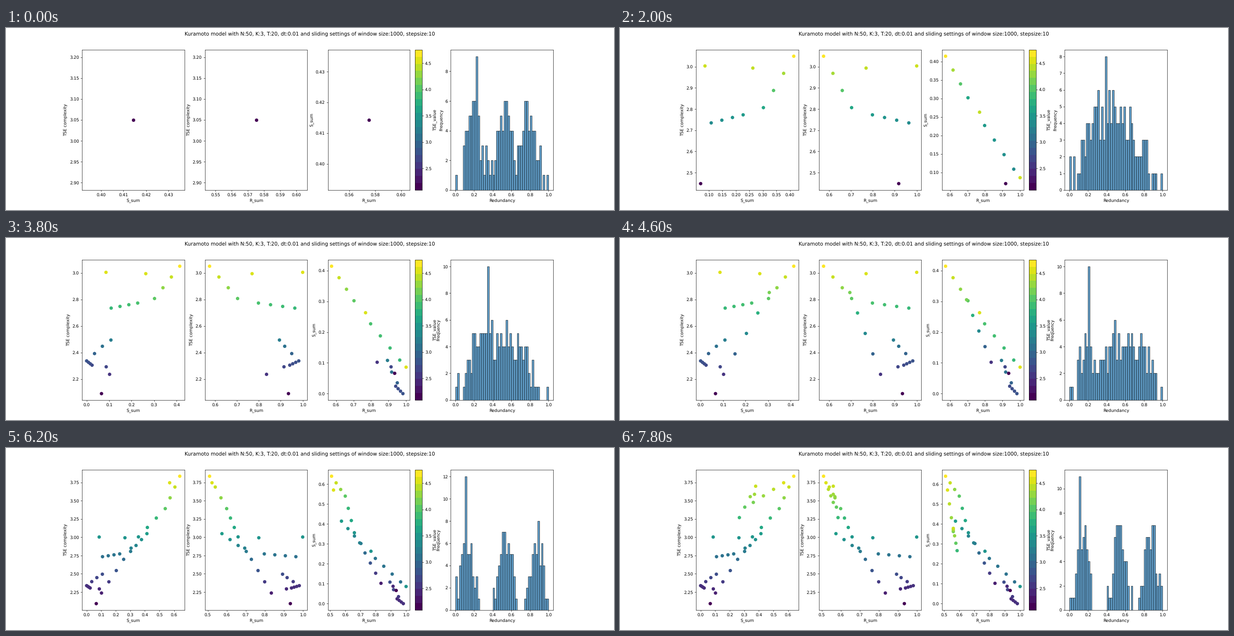
Recreate the animation shown at these times as a matplotlib script. Size 1280 px wide and 384 px high, loop 8000 ms.

```python
import numpy as np
import matplotlib.pyplot as plt
from matplotlib.animation import FuncAnimation
from matplotlib.cm import ScalarMappable
from matplotlib.colors import Normalize

FRAMES = 40
INTERVAL = 200
BINS = 50
NODES = 50

# Turning points of the path: step, S_sum, R_sum, TSE complexity
PATH = np.array([
    (0, .4143, .5751, 3.05), (3, .302, .703, 2.807), (4, .263, .769, 2.994),
    (5, .227, .798, 2.773), (8, .109, .964, 2.735), (9, .086, 1.0, 3.004),
    (10, .07, .918, 2.448), (12, 0, .982, 2.338), (15, .024, .941, 2.306),
    (16, .066, .935, 2.092), (18, .108, .894, 2.495), (19, .102, .835, 2.237),
    (24, .356, .66, 3.006), (27, .54, .6, 3.393), (30, .64, .51, 3.837),
    (34, .362, .561, 3.478), (36, .378, .561, 3.7), (39, .266, .586, 3.27)])

# Three clusters of values: step, their centres, spread, tallest bar and height
CLUSTERS = np.array([
    (0, .19, .52, .79, .085, .23, 9),
    (5, .21, .50, .76, .11, .17, 8),
    (10, .26, .47, .69, .14, .39, 8),
    (19, .25, .45, .69, .12, .35, 10),
    (27, .15, .53, .82, .065, .07, 10),
    (31, .12, .54, .87, .06, .11, 12),
    (39, .14, .54, .87, .06, .11, 11)])


def follow(keys, step):
    """Interpolate every column of keys at the given step or steps."""
    return [np.interp(step, keys[:, 0], col) for col in keys[:, 1:].T]


S, R, T = follow(PATH, np.arange(FRAMES))
EDGES = np.linspace(0, 1, BINS + 1)
MIDS = EDGES[:-1] + 0.5 / BINS


def bar_heights(i):
    *centres, spread, tallest, peak = follow(CLUSTERS, i)
    scale = NODES / BINS / (spread * np.sqrt(2 * np.pi))
    mean = sum(scale * np.exp(-((MIDS - c) / spread) ** 2 / 2)
               for c in centres)
    noise = np.random.default_rng(i).uniform(-1.6, 1.6, BINS)
    bars = np.where(mean > 0.5, np.round(mean + noise), 0)
    peak = round(peak)
    bars = np.clip(bars, 0, peak - 1)
    bars[int(tallest * BINS)] = peak
    bars[[0, -1]] = np.maximum(bars[[0, -1]], 1)
    return bars


def scatter(ax, x, y, c, xlabel, ylabel):
    ax.clear()
    ax.scatter(x, y, s=50, c=c, cmap='viridis')
    ax.set_xlabel(xlabel)
    ax.set_ylabel(ylabel)


def histogram(ax, bars):
    ax.clear()
    ax.hist(MIDS, bins=EDGES, weights=bars, edgecolor='black', alpha=0.7)
    ax.set_xlabel('Redundancy')
    ax.set_ylabel('Frequency')


plt.rcParams['text.hinting'] = 'none'
fig, axes = plt.subplots(1, 4, figsize=(20, 6), dpi=64)
fig.suptitle('Kuramoto model with N:50, K:3, T:20, dt:0.01 and sliding '
             'settings of window size:1000, stepsize:10')
shades = ScalarMappable(Normalize(2.09, 4.751),
                        plt.get_cmap('viridis').resampled(20))
fig.colorbar(shades, ax=axes[2], label='TSE_value',
             ticks=np.arange(2.5, 4.6, 0.5))


def draw(i):
    s, r, t = S[:i + 1], R[:i + 1], T[:i + 1]
    scatter(axes[0], s, t, t, 'S_sum', 'TSE complexity')
    scatter(axes[1], r, t, t, 'R_sum', 'TSE complexity')
    scatter(axes[2], r, s, t, 'R_sum', 'S_sum')
    histogram(axes[3], bar_heights(i))
    return []


def reset():
    return draw(0)


anim = FuncAnimation(fig, draw, frames=FRAMES, init_func=reset,
                     interval=INTERVAL, repeat=True, repeat_delay=0)
plt.show()
```
